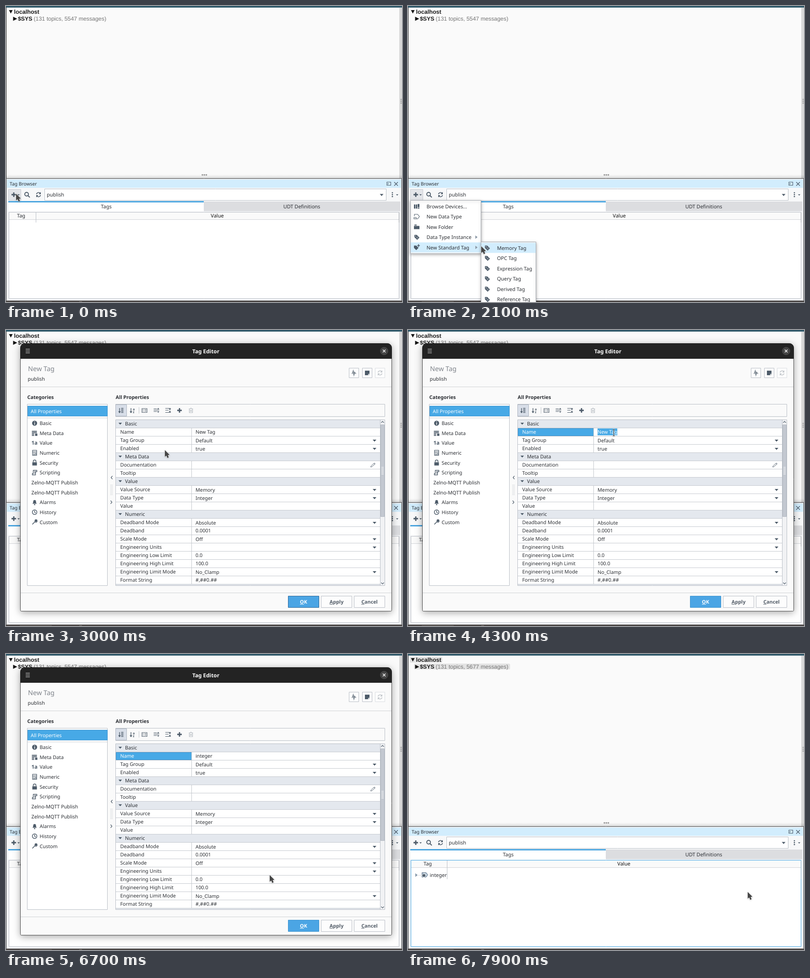
Animation of 865x648 px, one loop 8 s. Source, as an HTML page with a canvas:

```html
<!DOCTYPE html>
<html lang="en">
<head>
<meta charset="utf-8">
<title>Tag Editor</title>
<style>
  html, body { margin: 0; width: 100%; height: 100%; overflow: hidden; background: #fafafa; }
  canvas { display: block; }
</style>
</head>
<body>
<canvas id="stage" width="865" height="648"></canvas>
<script>
const ctx = document.getElementById('stage').getContext('2d');
ctx.textRendering = 'geometricPrecision';

const LOOP = 8000, STEP = 100;
const INK = '#2b2e33', ICON = '#4d5b69', LINE = '#b9bec6', BLUE = '#47a9e6', BLUE_EDGE = '#3d93cf', PALE = '#d2edfd';
const UI = '"Noto Sans", sans-serif', WEB = '"Liberation Sans", Arial, sans-serif';

// Pointer keys: time, x, y
const PATH = [
  [0, 22, 411], [100, 22, 411], [200, 23, 411], [800, 23, 412], [1300, 99, 501], [1600, 123, 517],
  [1800, 124, 519], [2600, 219, 538], [2800, 219, 538], [3000, 347, 263], [3400, 446, 216],
  [6000, 446, 216], [6900, 613, 561], [7200, 631, 585], [7600, 631, 585], [7800, 716, 541], [7900, 742, 521]
];

function box(x, y, w, h, fill, stroke, radius = 0) {
  const o = stroke ? 0.5 : 0;
  ctx.beginPath();
  ctx.roundRect(x + o, y + o, w - 2 * o, h - 2 * o, radius);
  if (fill) { ctx.fillStyle = fill; ctx.fill(); }
  if (stroke) { ctx.strokeStyle = stroke; ctx.lineWidth = 1; ctx.stroke(); }
}

function text(str, x, y, { size = 10.8, color = INK, bold = false, align = 'left', family = UI } = {}) {
  ctx.font = `${bold ? 'bold ' : ''}${size}px ${family}`;
  ctx.textAlign = align;
  ctx.fillStyle = color;
  ctx.fillText(str, x, Math.round(y));
}

function poly(color, ...points) {
  ctx.beginPath();
  points.forEach(([x, y]) => ctx.lineTo(x, y));
  ctx.closePath();
  ctx.fillStyle = color;
  ctx.fill();
}

function path(d, x, y, { stroke = ICON, fill, width = 1.5 } = {}) {
  const shape = new Path2D(d);
  ctx.save();
  ctx.translate(x, y);
  if (fill) { ctx.fillStyle = fill; ctx.fill(shape); }
  if (stroke) { ctx.strokeStyle = stroke; ctx.lineWidth = width; ctx.stroke(shape); }
  ctx.restore();
}

const down = (x, y, r = 4, color = ICON) => poly(color, [x - r, y - r / 2], [x + r, y - r / 2], [x, y + r * 0.6]);
const right = (x, y, r = 4, color = ICON) => poly(color, [x - r / 2, y - r], [x + r / 2 + 1, y], [x - r / 2, y + r]);

function dots(x, y, dx, dy, color, r = 1.6) {
  ctx.fillStyle = color;
  for (let i = -1; i <= 1; i++) {
    ctx.beginPath();
    ctx.arc(x + i * dx, y + i * dy, r, 0, 7);
    ctx.fill();
  }
}

function shadowed(blur, offset, alpha, draw) {
  ctx.save();
  ctx.shadowColor = `rgba(0,0,0,${alpha})`;
  ctx.shadowBlur = blur;
  ctx.shadowOffsetY = offset;
  draw();
  ctx.restore();
}

const SOLID = { stroke: null, fill: ICON };
const icons = {
  plus: (x, y, color = ICON) => path('M-5 0H5M0-5V5', x, y, { width: 2.8, stroke: color }),
  search: (x, y) => path('M3-1A4 4 0 1 1-5-1A4 4 0 1 1 3-1M2 2L6 6', x, y, { width: 1.9 }),
  refresh(x, y, color = ICON) {
    path('M-4.5-1A4.7 4.7 0 0 1 4-2.5M4.5 1A4.7 4.7 0 0 1-4 2.5', x, y, { stroke: color });
    path('M5-6V-1H.5ZM-5 6V1H-.5Z', x, y, { stroke: null, fill: color });
  },
  devices: (x, y) => path('M-6-4h3v9h-3zM-2-4h3v9h-3zM2-5h4v7h-4zM2 3h4v2h-4z', x, y, SOLID),
  type: (x, y) => path('M-5-1V-5H2L6 0L2 5H-1M-6 2h5v3h-5z', x, y, { width: 1.1 }),
  folder: (x, y) => path('M-5-3V-5H0V-3ZM-6-2H6V5H-6Z', x, y, SOLID),
  tag(x, y) {
    path('M-5-5H0L6 1L1 6L-5 0Z', x, y, SOLID);
    path('M-3-3h1v1h-1zM-1 0L2 3M1-1L3 1', x, y, { stroke: '#fff', width: 0.8 });
  },
  newTag(x, y) {
    path('M-6-4H-1L4 1L-1 6L-6 1Z', x, y, SOLID);
    path('M1-4H7M4-7V-1', x, y, { width: 1.7 });
  },
  info(x, y) {
    path('M5.5 0A5.5 5.5 0 1 1-5.5 0A5.5 5.5 0 1 1 5.5 0', x, y, SOLID);
    path('M0-3.5V-2M0-.8V3.5', x, y, { stroke: '#fff', width: 1.6 });
  },
  meta(x, y) {
    path('M-6-5H5V-3H-6ZM-6-2H5V0H-6ZM-6 1H-1V3H-6ZM-6 4H-1V6H-6ZM1 1H6V6H1Z', x, y, SOLID);
  },
  value: (x, y) => text('1a', x - 7, y + 4, { size: 11.5, bold: true, color: ICON }),
  numeric(x, y) {
    path('M-4.5-5.5h9v11h-9zM-4-2H4', x, y, { width: 1.2 });
    path('M-3 0h1.6v1.5h-1.6zM-.6 0h1.6v1.5h-1.6zM2 0h1.4v4.4h-1.4zM-3 3h4v1.4h-4z', x, y, SOLID);
  },
  security(x, y) {
    path('M-5-1H5V6H-5Z', x, y, SOLID);
    path('M-3-1V-3A3 3 0 0 1 3-3V-1', x, y);
  },
  scripting: (x, y) => path('M-3-5H5V-2H2V5H-5V2H-3ZM-1-2H2M-1 1H2', x, y, { width: 1.3 }),
  alarms: (x, y) => path('M-5 3Q-3 2-3-2Q-3-5 0-5Q3-5 3-2Q3 2 5 3ZM-1.5 4H1.5V6H-1.5Z', x, y, SOLID),
  history: (x, y) => path('M5 0A5 5 0 1 1-5 0A5 5 0 1 1 5 0M0-3.5V0L2.5 1.5', x, y),
  custom: (x, y) => path('M-5 5L1-1M1-4Q0 1 4 0Q6-1 5-4L3-2L2-3L4-5Q1-6 1-3', x, y, { width: 1.7 }),
  sort: (x, y) => path('M-3.5-5V4M-5.5 2L-3.5 5L-1.5 2M0-4.5H5M0-1.5H5M0 1.5H5M0 4.5H5', x, y, { width: 1.4 }),
  sortAlpha(x, y) {
    path('M-3-5V4M-5 2L-3 5L-1 2', x, y, { width: 1.4 });
    text('a', x + 1, y - 0.5, { size: 7, bold: true, color: ICON });
    text('z', x + 1, y + 6, { size: 7, bold: true, color: ICON });
  },
  card: (x, y) => path('M-5.5-4h11v8.5h-11zM-4-1.5h2M0-1.5h4M-4 1.5h2M0 1.5h4', x, y, { width: 1.1 }),
  expand(x, y) {
    path('M-6-3.5H1M-6-.5H6M-6 2.5H1', x, y, { width: 1.2 });
    path('M1.5-2.5L4-5.5L6.5-2.5ZM1.5 2H6.5L4 5Z', x, y, SOLID);
  },
  collapse(x, y) {
    path('M-6-4.5H6M-6-.5H1M-6 4.5H6', x, y, { width: 1.2 });
    path('M1.5-3.5H6.5L4-.5ZM1.5 3.5H6.5L4 .5Z', x, y, SOLID);
  },
  trash: (x, y) => path('M-4.5-3.5H4.5M-1.5-5H1.5M-3.5-3V5H3.5V-3M-1-1V3M1-1V3', x, y, { stroke: '#b4b9c0', width: 1.2 }),
  pulse: (x, y) => path('M-5 1H-3L-1.5-5L0 5L1.5-2L3 1H5', x, y, { width: 1.2 }),
  note: (x, y) => path('M-5-5H5V2H2V5H-5ZM3 5V3H5Z', x, y, SOLID),
  pencil: (x, y) => path('M-5 5L-4 2.5L3-4L5-2L-2.5 4.5ZM2-3L4-1', x, y, { stroke: '#5d6a77', width: 1 })
};

function drawTree(t) {
  box(0, 0, 865, 378, '#fafafa');
  box(859, 4, 6, 374, '#d9d9d9');
  box(0, 0, 865, 3.5, '#2e5768');
  box(0, 3, 1, 375, '#222');
  dots(863, 208.5, 0, 4, '#a5a5a5', 1.5);
  dots(433.3, 369.7, 4.3, 0, '#9b9b9b', 1.8);
  if (t >= 7800) {
    const flash = t >= 7900 ? '#e3e3e3' : '#d3d3d3';
    box(4, 6, 71, 13, flash, null, 3);
    box(13, 21, 210, 13, flash, null, 3);
  }
  poly('#111', [6.5, 9], [14.5, 9], [10.5, 16.5]);
  poly('#111', [15.5, 23.5], [24.5, 28], [15.5, 32.5]);
  const web = { size: 12.35, family: WEB };
  text('localhost', 17.5, 17, { ...web, size: 12.6, bold: true, color: '#1c1c1c' });
  text('$SYS', 26, 32, { ...web, bold: true, color: '#1c1c1c' });
  text(`(131 topics, ${t >= 7800 ? 5677 : 5547} messages)`, 60.5, 32, { ...web, color: '#747474' });
}

function drawBrowser(t) {
  const added = t >= 7700, column = added ? 85 : 65, edge = added ? BLUE : LINE, label = { size: 11 };
  const shade = ctx.createLinearGradient(0, 369, 0, 377);
  shade.addColorStop(0, 'rgba(0,0,0,0)');
  shade.addColorStop(1, 'rgba(0,0,0,.12)');
  box(0, 369, 865, 8, shade);
  box(0, 377, 865, 269, '#f0f1f3', '#4b4d50');
  box(1, 378, 863, 267, '#f2f3f5', '#d9dbde');
  box(2, 380, 861, 18, PALE);
  text('Tag Browser', 8, 393, { size: 10.3 });
  path('M-4-3.5h8.5v7h-8.5zM-2 1.5V0H0', 836, 389, { width: 1.1 });
  path('M-4-4L4 4M4-4L-4 4', 852, 389.5, { width: 1.3 });
  box(3, 398, 859, 30, '#f7f8f9');
  if (t < 2700) box(5, 401, 28, 25, '#e3e5e9', '#c9ccd1');
  icons.plus(17, 413);
  down(27.5, 413.5, 2.6);
  icons.search(46, 413);
  icons.refresh(71, 413);
  box(84, 400, 747, 26, '#fff', LINE);
  text('publish', 89, 417, label);
  down(820.5, 413.5);
  dots(844, 413, 0, 4.2, ICON, 1.4);
  down(854.5, 413.5, 2.6);

  box(432, 428, 429, 21, '#dcdde0');
  box(5, 428, 427, 22, '#fff');
  box(5, 427, 427, 3, '#4aa5df');
  text('Tags', 219, 442.5, { ...label, align: 'center' });
  text('UDT Definitions', 646, 442.5, { ...label, align: 'center' });

  box(6, 451, 853, 190, '#fff', edge);
  box(7, 452, 851, 15, '#fafafa');
  box(7, 467, 851, 1, '#cfd2d6');
  const bottom = added ? 493 : 474;
  box(column, 452, 1, bottom - 452, LINE);
  box(858, 452, 1, bottom - 452, added ? '#7fa9c8' : '#9a9ea5');
  text('Tag', column / 2 + 0.5, 463, { ...label, align: 'center' });
  text('Value', (column + 858) / 2, 463, { ...label, align: 'center', color: '#111' });
  if (added) {
    right(18, 484, 4, '#8799ab');
    for (let x = 22; x < 29; x += 2) box(x, 484, 1, 1, '#b9bec6');
    path('M-6-5H3L7 0L3 5H-6Z', 36.5, 483.5, { stroke: '#66788a', fill: '#a9bccd', width: 1 });
    path('M-6 1Q-2-5 2 0Q2 5-3 5ZM-1-4L5 1', 36.5, 483.5, { stroke: '#fff', fill: ICON, width: 0.9 });
    text('integer', 47.5, 487.5, label);
  }
  box(0, 645, 865, 3, '#4c4847');
  box(30, 646.5, 70, 1.5, '#676260');
  box(160, 646.5, 6, 1.5, '#77716e');
}

function drawMenu(x, y, w, items, active) {
  const rowHeight = 22.5;
  shadowed(6, 2, 0.3, () => box(x, y, w, items.length * rowHeight + 5, '#fff', '#a3a8af'));
  items.forEach(([name, icon, more], i) => {
    const mid = y + 13.5 + i * rowHeight;
    if (i === active) box(x + 1, mid - 11, w - 2, 22, PALE);
    icons[icon](x + 14, mid);
    text(name, x + 35.5, mid + 4, { size: 10.95 });
    if (more) right(x + 144, mid, 3.8, '#8b98a6');
  });
}

const ADD_ITEMS = [
  ['Browse Devices...', 'devices'], ['New Data Type', 'type'], ['New Folder', 'folder'],
  ['Data Type Instance', 'tag', true], ['New Standard Tag', 'newTag', true]
];
const TAG_ITEMS = ['Memory Tag', 'OPC Tag', 'Expression Tag', 'Query Tag', 'Derived Tag', 'Reference Tag']
  .map(name => [name, 'tag']);

const CATEGORIES = [
  ['Basic', 'info'], ['Meta Data', 'meta'], ['Value', 'value'], ['Numeric', 'numeric'], ['Security', 'security'],
  ['Scripting', 'scripting'], ['Zelno-MQTT Publish'], ['Zelno-MQTT Publish'], ['Alarms', 'alarms'],
  ['History', 'history'], ['Custom', 'custom']
];

// Name, value, editor kind; a row without a value is a group heading
const PROPERTIES = [
  ['Basic'], ['Name', 'New Tag'], ['Tag Group', 'Default', 'list'], ['Enabled', 'true', 'list'],
  ['Meta Data'], ['Documentation', '', 'pencil'], ['Tooltip', ''],
  ['Value'], ['Value Source', 'Memory', 'list'], ['Data Type', 'Integer', 'list'], ['Value', ''],
  ['Numeric'], ['Deadband Mode', 'Absolute', 'list'], ['Deadband', '0.0001'], ['Scale Mode', 'Off', 'list'],
  ['Engineering Units', '', 'list'], ['Engineering Low Limit', '0.0'], ['Engineering High Limit', '100.0'],
  ['Engineering Limit Mode', 'No_Clamp', 'list'], ['Format String', '#,##0.##']
];

const KEY_TIMES = [4700, 4800, 4900, 5000, 5200, 5300, 5500];

function drawNameValue(t, y) {
  const typed = KEY_TIMES.filter(k => t >= k).length;
  const value = typed ? 'integer'.slice(0, typed) : 'New Tag';
  ctx.font = `10.8px ${UI}`;
  const width = ctx.measureText(value).width;
  const selected = t >= 3700 && !typed;
  if (selected) box(414, y - 7.5, width, 15, BLUE);
  text(value, 414, y + 4, { color: selected ? '#fff' : INK });
  const caretOn = (t >= 3700 && t < 4300) || (typed && t < 6100);
  if (caretOn) box(Math.round(414 + width), 215, 1, 16, '#222');
}

function drawProperties(t) {
  const rowHeight = 18;
  box(239, 196, 589, 364, '#fff', LINE);
  PROPERTIES.forEach(([name, value, kind], i) => {
    const top = 196 + i * rowHeight, mid = top + 9;
    box(240, top + 18, 578, 1, '#c5c9cf');
    if (value === undefined) {
      box(240, top + 1, 578, 17, '#e4e8ee');
      down(249.5, mid, 3.8);
      text(name, 260, mid + 4);
    } else {
      const active = name === 'Name' && t >= 3600;
      if (active) box(240, top + 1, 166, 17, BLUE, BLUE_EDGE);
      text(name, 249.5, mid + 4, { color: active ? '#fff' : INK });
      if (name === 'Name') drawNameValue(t, mid);
      else text(value, 414, mid + (kind ? 5 : 4));
      if (kind === 'list') down(805, mid + 1, 4);
      if (kind === 'pencil') icons.pencil(801.5, mid);
      box(405, top, 1, 18, '#c2c6cc');
    }
  });
  box(240, 557, 578, 2, '#e4e8ee');
  box(817, 197, 1, 362, LINE);
  box(818, 197, 9, 362, '#f1f2f4');
  box(818, 207, 9, 202, '#c3c8d0', '#b3b9c2');
  for (let y = 300; y < 316; y += 3) box(820, y, 5, 1, '#f7f8fa');
  path('M-3 1.5L0-1.5L3 1.5', 822.5, 201.5, { width: 1.1 });
  path('M-3-1.5L0 1.5L3-1.5', 822.5, 554.5, { width: 1.1 });
}

function drawButton(x, label, fill, edge, color) {
  box(x, 582, 68, 26, fill, edge);
  text(label, x + 34, 599, { bold: true, align: 'center', color });
  const left = x + 34 - ctx.measureText(label).width / 2;
  box(left, 600, ctx.measureText(label[0]).width, 1, color);
}

function drawDialog(t, hover) {
  const corners = [10, 10, 2, 2];
  shadowed(16, 3, 0.35, () => box(31, 29, 812, 587, '#fafafa', null, corners));
  box(31, 29, 812, 587, null, '#4a4a4a', corners);
  box(31, 29, 812, 34, '#232323', null, [10, 10, 0, 0]);
  path('M-4.5-4H4.5M-4.5 0H4.5M-4.5 4H4.5', 47.5, 46, { stroke: '#eee', width: 1.2 });
  text('Tag Editor', 436.5, 51, { size: 11.8, bold: true, align: 'center', color: '#fff' });
  ctx.beginPath();
  ctx.arc(826, 46, 9, 0, 7);
  ctx.fillStyle = '#444';
  ctx.fill();
  path('M-3-3L3 3M3-3L-3 3', 826, 46, { stroke: '#fff', width: 1.4 });

  text('New Tag', 48, 90, { size: 14.5, color: '#80858c' });
  text('publish', 47.5, 111);
  [749, 778, 806].forEach(x => box(x, 83, 22, 22, '#fdfdfd', x === 806 ? '#dadde1' : LINE));
  icons.pulse(760, 94);
  icons.note(789, 94);
  icons.refresh(817, 94, '#c3c7cc');
  box(32, 124, 810, 1, '#cfd1d4');
  box(32, 575, 810, 1, '#cfd1d4');

  text('Categories', 46.5, 151, { bold: true });
  box(46, 162, 176, 398, '#fff', LINE);
  box(47, 166, 175, 23, BLUE, BLUE_EDGE);
  text('All Properties', 54, 182, { color: '#fff' });
  box(47, 192, 174, 1, '#cbced3');
  CATEGORIES.forEach(([name, icon], i) => {
    const y = 204 + i * 21.65;
    if (icon) icons[icon](62.5, y);
    text(name, icon ? 73.5 : 55.5, y + 4);
  });

  path('M1.5-3.5L-1.5 0L1.5 3.5', 231, 323, { width: 1.2 });
  for (let y = 339; y < 361; y += 3) for (let x = 228; x < 234; x += 2) box(x, y, 1, 1, '#b5bac1');
  path('M-1.5-3.5L1.5 0L-1.5 3.5', 230, 377, { width: 1.2 });

  text('All Properties', 239.5, 151, { bold: true });
  box(239, 162, 589, 28, '#fafafa', LINE);
  box(239, 163, 25, 26, '#d8dee8', '#adb5c0');
  icons.sort(251.5, 176);
  icons.sortAlpha(276, 176);
  box(290, 169, 1, 14, '#c3c7cd');
  icons.card(302.5, 176);
  icons.expand(328.5, 176);
  icons.collapse(354, 176);
  icons.plus(379, 176);
  icons.trash(404, 176);
  drawProperties(t);

  const okFill = hover ? '#3a86c1' : '#4ba5e4';
  const okEdge = hover || t < 3600 ? '#2a6496' : BLUE_EDGE;
  drawButton(616, 'OK', okFill, okEdge, '#fff');
  drawButton(688, 'Apply', '#fdfdfd', LINE, '#535d68');
  drawButton(760, 'Cancel', '#fdfdfd', LINE, '#535d68');
}

function pointerAt(t) {
  const next = PATH.findIndex(key => key[0] > t);
  if (next < 0) return PATH[PATH.length - 1].slice(1);
  const [t0, x0, y0] = PATH[next - 1], [t1, x1, y1] = PATH[next];
  const k = (t - t0) / (t1 - t0);
  return [Math.round(x0 + (x1 - x0) * k), Math.round(y0 + (y1 - y0) * k)];
}

function drawPointer(t, x, y) {
  if (t >= 3900 && t < 6100) {
    const beam = 'M-2.5-7H-.5L0-6.5L.5-7H2.5M0-6.5V6.5M-2.5 7H-.5L0 6.5L.5 7H2.5';
    path(beam, 449.5, 225, { stroke: 'rgba(255,255,255,.8)', width: 2.6 });
    path(beam, 449.5, 225, { stroke: '#333', width: 1.2 });
    return;
  }
  const arrow = 'M0 0V14.5L3.3 12L5.5 17.3L8.6 15.8L6.5 11L10.3 10.3Z';
  shadowed(3, 1, 0.3, () => path(arrow, x, y, { stroke: 'rgba(255,255,255,.75)', width: 1.2 }));
  path(arrow, x, y, { stroke: null, fill: '#464646' });
}

function draw(t) {
  const [x, y] = pointerAt(t);
  drawTree(t);
  drawBrowser(t);
  if (t >= 600 && t < 2700) {
    const row = Math.floor((y - 427.5) / 22.5);
    const submenu = t >= 1800;
    drawMenu(5, 425, 155, ADD_ITEMS, submenu ? 4 : row);
    if (submenu) drawMenu(159, 516, 121, TAG_ITEMS, x >= 159 ? 0 : -1);
  }
  if (t >= 2900 && t < 7600) drawDialog(t, x >= 616 && y >= 582);
  drawPointer(t, x, y);
}

function tick() {
  draw(Math.floor(performance.now() % LOOP / STEP) * STEP);
  requestAnimationFrame(tick);
}
tick();
</script>
</body>
</html>
```
